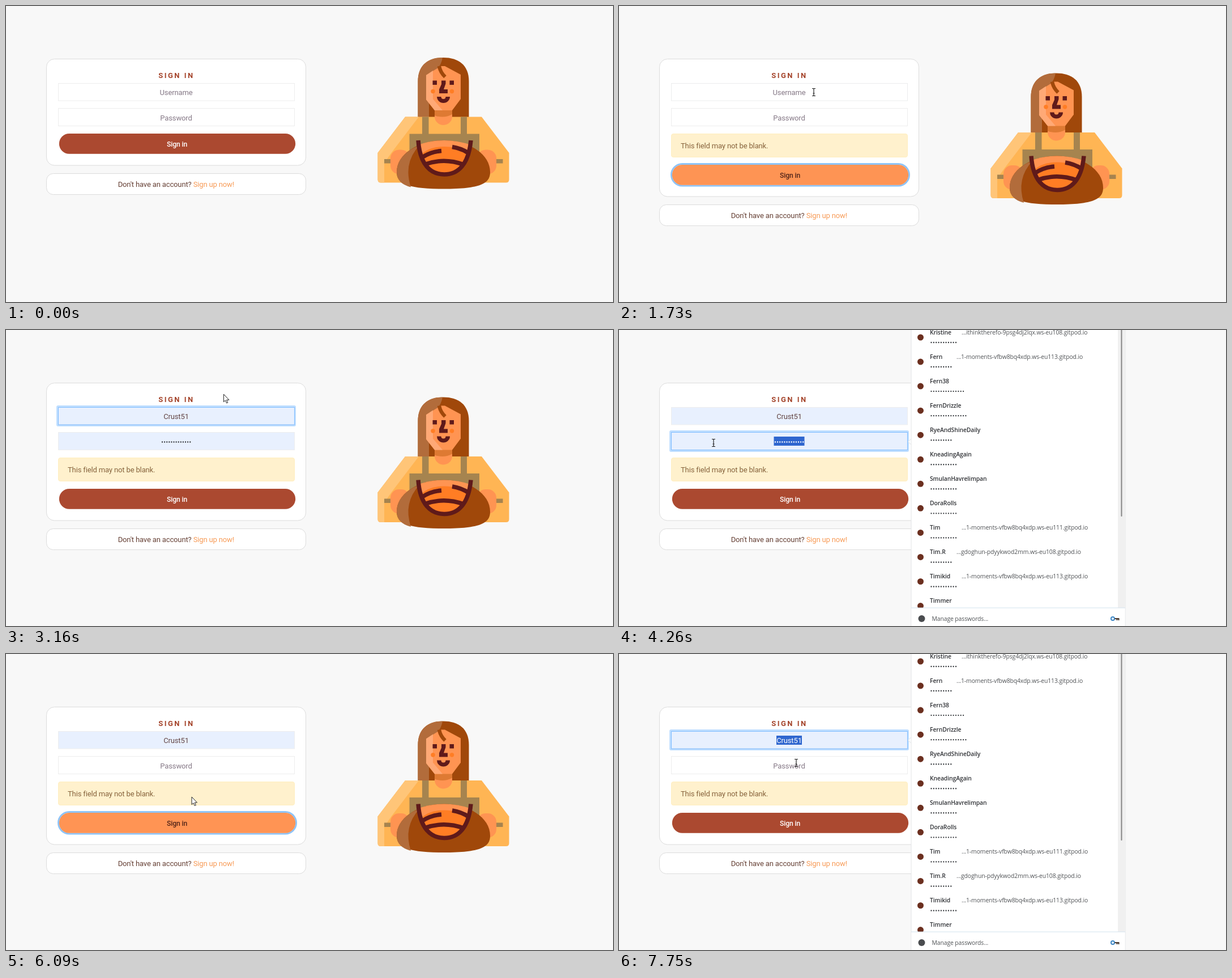
Recreate the animation shown at these times as an HTML page. Size 1072x522 px, loop 8000 ms.

```html
<!DOCTYPE html>
<html lang="en">
<head>
<meta charset="utf-8">
<title>Sign in</title>
<style>
  html, body { margin: 0; width: 100%; height: 100%; overflow: hidden; background: #f8f8f8; }
  svg { display: block; width: 100%; height: 100%; }
  text { font: 13px Roboto, sans-serif; letter-spacing: -.14px; white-space: pre; }
  .mid { text-anchor: middle; }
  .card { fill: #fff; stroke: #dcdcdc; }
  .hint { fill: #857886; }
  .value { fill: #634545; }
  .box { stroke: #ededed; }
  .ring { fill: none; stroke: #007bff; stroke-opacity: .25; stroke-width: 3; }
  .edge { fill: none; stroke: #80bdff; }
  .sel { fill: #2f66cf; }
  #popup text { font: 10.4px "Open Sans", "Noto Sans", sans-serif; letter-spacing: -.1px; fill: #505356; }
  #popup .name { font-weight: 600; fill: #303236; }
  .dots { fill: none; stroke: #3c3f43; stroke-width: 2.4; stroke-linecap: round; }
  #cursor > * { fill: #fff; stroke: #222; stroke-linejoin: round; }
</style>
</head>
<body>
<svg viewBox="0 0 1072 522">
  <g id="baker">
    <path fill="#a0480a" d="M727.5 196V133C727.5 104 746 91 772.5 91S817.5 104 817.5 133V196Z"/>
    <path fill="#b26c3b" d="M727.5 196V133C727.5 104 746 91 771 91Q768 108 754 118L747 165V196Z"/>
    <path fill="#ffb554" d="M705 195.5H840L888.5 259V306q0 5.5-5.5 5.5H662q-5.5 0-5.5-5.5V259Z"/>
    <path fill="#ffc578" d="M705 195.5H729L680.5 259 668 277V311.5H662q-5.5 0-5.5-5.5V259Z"/>
    <path fill="#a6844f" d="M735 195.5h11.5v30H803v-30h11V225.5h22V290H712.5V225.5H735ZM668 270h14v7.5H668ZM863 270h14.5v7.5H863Z"/>
    <path fill="#ff9452" d="M757 180h31v15a15.5 15 0 0 1-31 0Z"/>
    <path fill="#de7a33" d="M757 183h31v8q-15 8-31 2Z"/>
    <path fill="#ff9452" d="M742 122L768 106H775L803 121V164L788 184H757L742 165Z"/>
    <path fill="#ffa976" d="M742 122L754 114V164L771 184H757L742 165Z"/>
    <path fill="none" stroke="#a0480a" stroke-width="6.5" d="M765 106Q767 117 775.5 125"/>
    <path fill="#5f1a1a" d="M753.5 131.5h7.5v7.5h-7.5ZM783.5 131.5h7.5v7.5h-7.5ZM769 131.5h7.5V137L773 147h7v7H765V147L769 138ZM761 160h7.5a4 4 0 0 0 8 0h7.5a11.5 11 0 0 1-23 0Z"/>
    <g fill="#ff7d24"><circle cx="754" cy="150.5" r="3.7"/><circle cx="787.5" cy="150.5" r="3.7"/></g>
    <g fill="#ff9452"><rect x="679" y="253.5" width="34" height="43" rx="15"/><rect x="832" y="253.5" width="34" height="43" rx="15"/></g>
    <path fill="#a0480a" d="M690 293C690 260 730 237 773 237S855 260 855 293C855 313 838 322.5 773 322.5S690 313 690 293Z"/>
    <path fill="#b26c3b" d="M690 293C690 270 708 254 730 246Q701 277 715 319.5Q690 313 690 293Z"/>
    <path fill="#ff9452" d="M728 245Q773 229 821 245C815 283 797 297 773 297S734 283 728 245Z"/>
    <path fill="#ff7d24" d="M732 263Q746 248 774 248T816 262C808 288 793 297 773 297S740 288 732 263Z"/>
    <path fill="none" stroke="#5f1a1a" stroke-width="7.5" d="M728 237C731 280 750 297 774 297S817 280 821 237M735 267Q750 257 769 255.5M788 248.5Q804 251 817 259.5M739 279.5Q773 267 808 279.5"/>
  </g>

  <rect id="card" class="card" x="71.5" y="93.5" width="458" height="187.5" rx="14"/>
  <text class="mid" x="301" y="126.8" fill="#a4432a" style="font-weight:700;letter-spacing:2.5px">SIGN IN</text>

  <g id="user">
    <rect class="box" x="92.5" y="136.5" width="417" height="30.5"/>
    <g class="focus"><rect class="ring" x="90.5" y="134.5" width="420" height="34" rx="1.5"/><rect class="edge" x="92.5" y="136.5" width="417" height="30.5"/></g>
    <text class="hint mid" x="300.5" y="156.7">Username</text>
    <rect class="sel" x="278" y="144" width="45" height="16"/>
    <text class="value mid" x="300.5" y="156.7">Crust51</text>
    <rect class="caret" x="322" y="143" width="1" height="16" fill="#333"/>
  </g>
  <g id="pass">
    <rect class="box" x="92.5" y="180.5" width="417" height="31"/>
    <g class="focus"><rect class="ring" x="90.5" y="178.5" width="420" height="35" rx="1.5"/><rect class="edge" x="92.5" y="180.5" width="417" height="31"/></g>
    <text class="hint mid" x="300.5" y="201.5">Password</text>
    <rect class="sel" y="188" height="16"/>
    <path class="value dots" d="M276 197.500h50" stroke-dasharray="0 4.1"/>
  </g>

  <g id="alert">
    <rect x="92.5" y="225.5" width="417" height="41" rx="3.5" fill="#fff1cd" stroke="#ffeebf"/>
    <text x="109" y="251" fill="#86633c">This field may not be blank.</text>
  </g>
  <g id="button">
    <rect class="halo" x="92.5" y="223.5" width="420" height="38.5" rx="19.2" fill="none" stroke="#8ec4f8" stroke-width="3"/>
    <rect class="face" x="93.8" y="225" width="417.4" height="35.8" rx="17.9"/>
    <text class="mid" x="302" y="247.7" style="font-size:12.200px;font-weight:500">Sign in</text>
  </g>
  <g id="foot">
    <rect class="card" x="71.5" y="295.5" width="458" height="37" rx="12"/>
    <text class="mid" x="300.3" y="318.8" fill="#664035">Don't have an account? <tspan fill="#f79a55">Sign up now!</tspan></text>
  </g>

  <g id="popup">
    <path id="notch" d="M517-6L510.5 0 517 6" fill="#fff" stroke="#dfe3e6"/>
    <rect x="516" y="-217" width="378" height="744" rx="4" fill="#fff" stroke="#e2e4e6"/>
    <rect x="881" y="-210" width="12.5" height="700" fill="#f0f0f0"/>
    <rect x="886.5" y="-200" width="2" height="529" rx="1" fill="#858585"/>
    <g id="rows"></g>
    <path d="M516.5 490H893.5V523q0 4-4 4H520.5q-4 0-4-4Z" fill="#fff"/>
    <path d="M516 490H894" stroke="#d3e2ee"/>
    <circle cx="534.5" cy="509" r="6" fill="#4a4c4f"/>
    <text x="552.5" y="512.8">Manage passwords...</text>
    <circle cx="872" cy="509" r="3" fill="none" stroke="#3f88c5" stroke-width="2"/>
    <path d="M875.5 509H883.5M879.5 509v3M882.5 509v3" stroke="#4a3a30" stroke-width="2"/>
  </g>

  <g id="cursor">
    <path id="arrow" d="M0 0V13.5L3 10.8 5.2 15.6 7.3 14.7 5.2 10H9.5Z"/>
    <path id="beam" style="fill:none" stroke-width="1.2" d="M-3-6.5h2q1 0 1 1v11q0 1-1 1h-2M3-6.5H1q-1 0-1 1v11q0 1 1 1h2M-1.5 2h3"/>
    <path id="hand" d="M-1.6 1.5a1.6 1.6 0 0 1 3.2 0V7l1-.4q1.5-.3 1.8 1l1-.2q1.2 0 1.5 1.2l.8-.1q1.3.2 1.3 1.6V14q0 2-1.4 3v2H-1.5V17L-5.6 11.6q-.9-1.5.4-2.2 1-.5 2 .5l1.6 1.6Z"/>
  </g>
</svg>
<script>
const $ = s => document.querySelector(s);
const set = (s, attrs) => { for (const k in attrs) $(s).setAttribute(k, attrs[k]); };
const show = (s, on) => set(s, { opacity: +on });

// name, number of password dots, address
const hosts = ["...ithinktherefo-9psg4dj2lqx.ws-eu108.gitpod.io", "...1-moments-vfbw8bq4xdp.ws-eu113.gitpod.io",
  "...1-moments-vfbw8bq4xdp.ws-eu111.gitpod.io", "...gdoghun-pdyykwod2mm.ws-eu108.gitpod.io"];
const logins = [["Kristine", 11, hosts[0]], ["Fern", 9, hosts[1]], ["Fern38", 14], ["FernDrizzle", 15],
  ["RyeAndShineDaily", 9], ["KneadingAgain", 11], ["SmulanHavrelimpan", 11], ["DoraRolls", 11],
  ["Tim", 11, hosts[2]], ["Tim.R", 9, hosts[3]], ["Timikid", 11, hosts[1]], ["Timmer", 11]];
$("#rows").innerHTML = logins.map(([name, dots, host], i) => {
  const y = 4 + i * 43.05, x = i == 1 || i == 9 ? 596 : 605;
  return `<circle cx="532.5" cy="${y + 9}" r="5.5" fill="#6b2f1f"/>
    <text class="name" x="549" y="${y + 3.8}">${name}</text>
    <path class="dots" d="M551.5 ${y + 18}h${dots * 4.35 - 4}" stroke-dasharray="0 4.35"/>
    ${host ? `<text x="${x}" y="${y + 3.8}">${host}</text>` : ""}`;
}).join("");

// time, x, y of the pointer
const path = [[130, 906, 491], [630, 344, 241], [1180, 344, 241], [1530, 344, 152], [2540, 344, 152],
  [2950, 434, 36], [3380, 332, 195], [3840, 332, 195], [4200, 167, 199], [4390, 167, 199],
  [4610, 321, 314], [4680, 321, 314], [4960, 324, 308], [6050, 324, 308], [6090, 328, 252],
  [6300, 344, 139], [6550, 344, 139], [6630, 346, 154], [7400, 346, 154], [7680, 307, 190],
  [7750, 313, 192], [8000, 313, 192]];

const ramp = (t, start, len = 150) => Math.min(1, Math.max(0, (t - start) / len));
const within = (t, a, b) => t >= a && t < b;
const mix = (a, b, k) => a.map((v, i) => v + (b[i] - v) * k);
const rgb = c => `rgb(${c.map(Math.round)})`;

function pointer(t) {
  const i = Math.max(1, path.findIndex(p => p[0] > t));
  const [a, b] = [path[i - 1], path[i]];
  const k = ramp(t, a[0], b[0] - a[0]);
  return mix(a, b, k * k * (3 - 2 * k)).slice(1);
}

function draw(t) {
  const warned = t >= 970, drop = warned ? 55 : 0;
  set("#baker", { transform: `translate(0 ${drop / 2})` });
  set("#card", { height: 187.5 + drop });
  set("#button", { transform: `translate(0 ${drop})` });
  set("#foot", { transform: `translate(0 ${drop})` });
  show("#alert", warned);

  const [x, y] = pointer(t);
  const named = t >= 2600, secret = within(t, 2600, 4340), picked = t >= 6980;
  show("#user .focus", ramp(t, 1730) - ramp(t, 3840) + ramp(t, 6910));
  show("#user .hint", !named);
  show("#user .value", named);
  show("#user .sel", picked);
  show("#user .caret", within(t, 2600, 3110) || within(t, 3640, 3840));
  set("#user .value", { style: picked ? "fill:#fff" : "" });
  set("#user .box", { fill: named ? "#e8f0fe" : "#fff" });

  const from = Math.max(273.5, Math.min(327.5, x)), dragged = within(t, 3840, 4340);
  show("#pass .focus", ramp(t, 3840) - ramp(t, 4940));
  show("#pass .hint", !secret);
  show("#pass .value", secret);
  show("#pass .sel", dragged);
  set("#pass .sel", { x: from, width: 327.5 - from });
  set("#pass .value", { style: dragged && from < 300 ? "stroke:#fff" : "" });
  set("#pass .box", { fill: secret ? "#e8f0fe" : "#fff" });

  const warm = ramp(t, 430) - ramp(t, 1730) + ramp(t, 4560) - ramp(t, 6910);
  const press = ramp(t, 890, 40) - ramp(t, 950, 60) + ramp(t, 4940, 60) - ramp(t, 5190, 100);
  const tone = (cold, hot, down) => rgb(mix(mix(cold, hot, warm), down, press));
  show("#button .halo", ramp(t, 900, 100) - ramp(t, 1730) + ramp(t, 4950) - ramp(t, 6910));
  set("#button .face", { fill: tone([171, 73, 48], [255, 148, 84], [207, 125, 97]), stroke: `rgba(60,95,140,${press * .8})` });
  set("#button text", { fill: tone([255, 255, 255], [80, 36, 24], [228, 190, 172]) });

  const open = ramp(t, 2000, 220) - ramp(t, 2525, 215) + ramp(t, 3950, 200) - ramp(t, 5020, 215) + ramp(t, 7050, 200);
  set("#popup", { opacity: open, transform: `translate(705 155) scale(${.95 + .05 * open}) translate(-705 -155)` });
  set("#notch", { transform: `translate(0 ${within(t, 3840, 6000) ? 197 : 152})` });

  const inField = within(y, 136, 168) || within(y, 180, 212);
  const onButton = within(y, 225 + drop, 261 + drop);
  const kind = !within(x, 92, 511) ? "arrow" : inField ? "beam" : onButton ? "hand" : "arrow";
  for (const k of ["arrow", "beam", "hand"]) show("#" + k, k == kind);
  show("#cursor", within(t, 130, 2540) || within(t, 2950, 4340) || t >= 4400);
  set("#cursor", { transform: `translate(${x} ${y})` });
}

const start = performance.now();
function tick() {
  draw((performance.now() - start) % 8000);
  requestAnimationFrame(tick);
}
tick();
</script>
</body>
</html>
```
